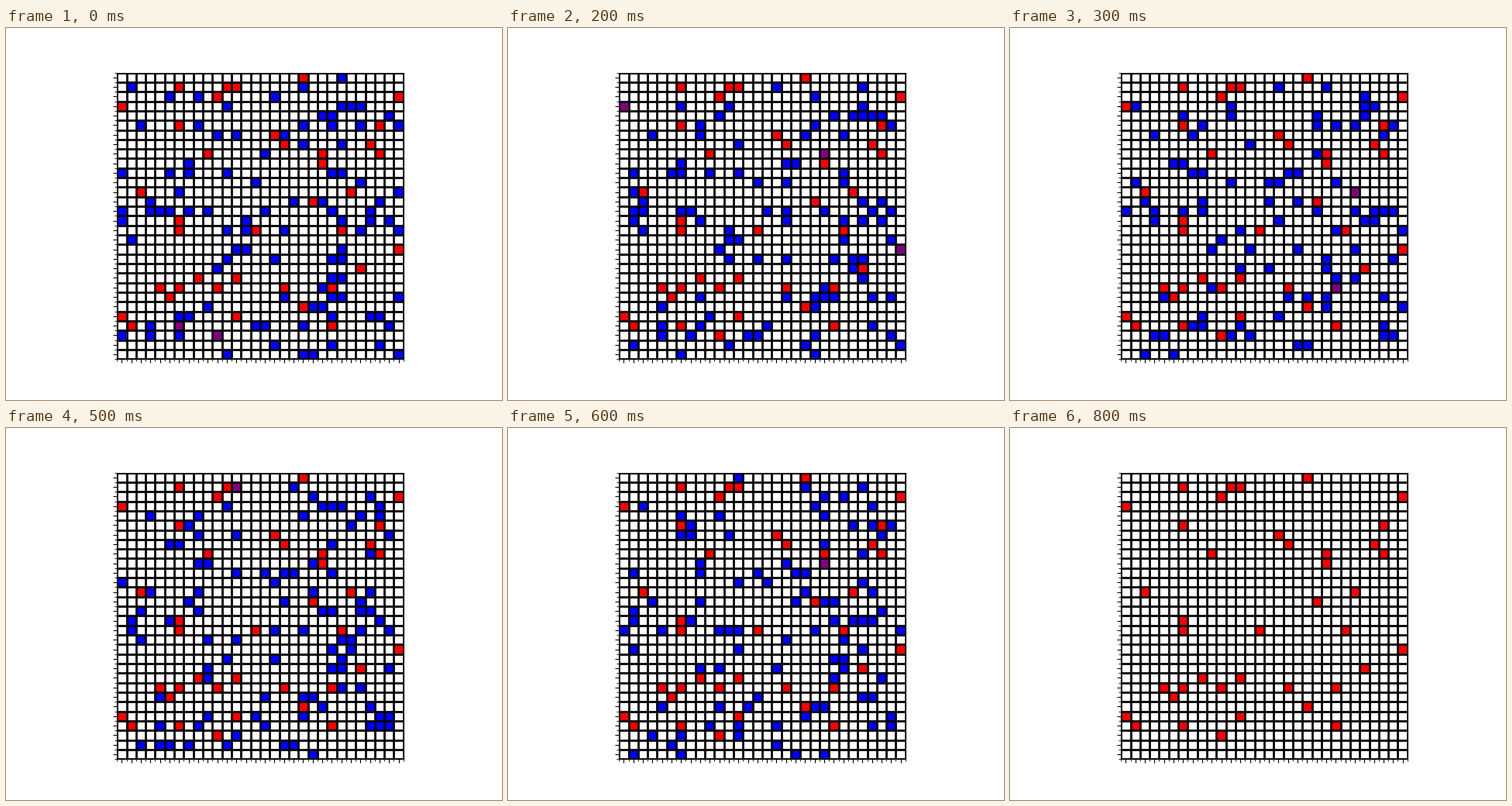
A matplotlib script for the animation above (5000 ms loop, 640 px wide and 480 px high).

```python
import numpy as np
import matplotlib.pyplot as plt
from matplotlib.animation import FuncAnimation
from matplotlib.colors import ListedColormap

SIZE = 30
WALKERS = 100
WALK_STEPS = 8  # the walkers vanish after this many pictures
STEP_MS = 100
LOOP_MS = 5000

# Fixed cells, as row from the top: columns.
TRAPS = {
    0: [19], 1: [6, 11, 12], 2: [10, 29], 3: [0], 5: [6, 27], 6: [16],
    7: [17, 26], 8: [9, 21, 27], 9: [21], 12: [2, 24], 13: [20], 15: [6],
    16: [6, 14, 23], 18: [29], 20: [25], 21: [8, 12],
    22: [4, 6, 10, 17, 22], 23: [5], 24: [19], 25: [0, 12],
    26: [1, 6, 22], 27: [10],
}


def random_walk(seed=4):
    """Scatter walkers on distinct cells; each step moves them at most one
    cell along each axis, and they bounce off the border."""
    rng = np.random.default_rng(seed)
    spots = rng.choice(SIZE * SIZE, WALKERS, replace=False)
    cells = np.array(np.unravel_index(spots, (SIZE, SIZE)))
    path = [cells]
    last = SIZE - 1
    for _ in range(WALK_STEPS - 1):
        cells = np.abs(cells + rng.integers(-1, 2, cells.shape))
        cells = last - np.abs(last - cells)
        path.append(cells)
    return path


path = random_walk()


def grid_at(step):
    """0 empty, 1 walker, 2 trap, 3 walker on a trap."""
    grid = np.zeros((SIZE, SIZE), int)
    if step < WALK_STEPS:
        grid[tuple(path[step])] = 1
    for row, columns in TRAPS.items():
        grid[row, columns] += 2
    return grid


fig, ax = plt.subplots(figsize=(6.4, 4.8), dpi=100)
cmap = ListedColormap(["white", "blue", "red", "purple"])
image = ax.imshow(grid_at(0), cmap=cmap, vmin=0, vmax=3)

for axis in (ax.xaxis, ax.yaxis):
    axis.set_ticks(np.arange(SIZE), labels=[])
    axis.set_ticks(np.arange(-0.5, SIZE), minor=True)
ax.grid(which="minor", color="black", linewidth=2)


def update(step):
    image.set_data(grid_at(step))
    return (image,)


anim = FuncAnimation(fig, update, frames=LOOP_MS // STEP_MS,
                     interval=STEP_MS, repeat=True, repeat_delay=0)
plt.show()
```
